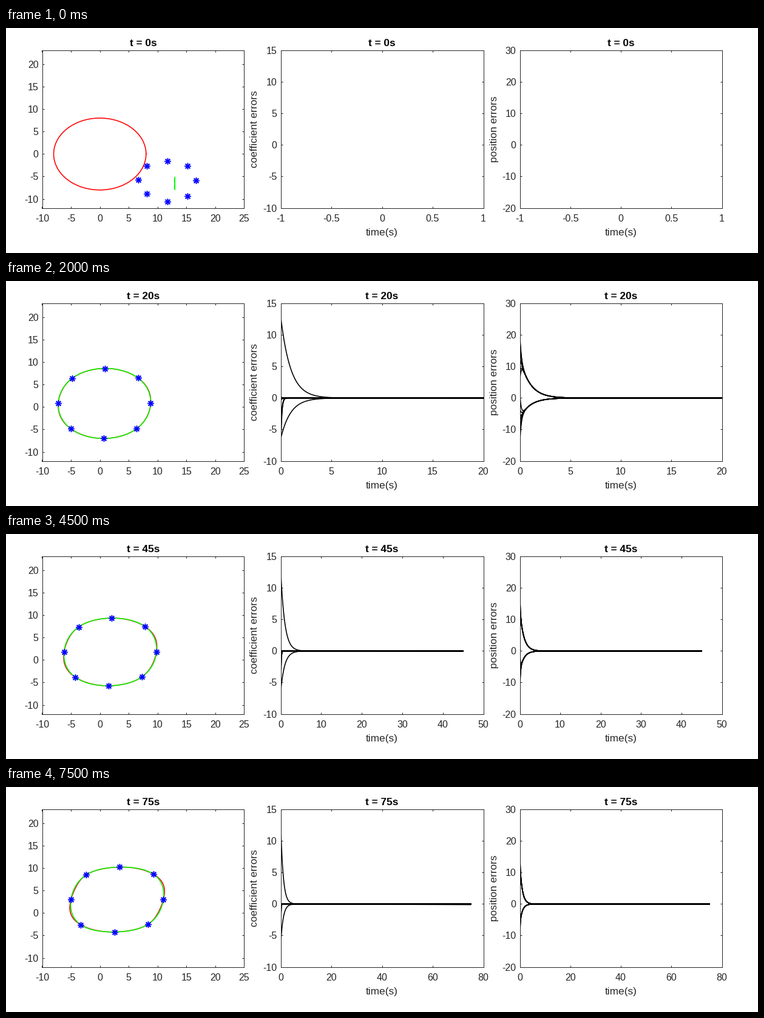
A matplotlib script for the animation above (8000 ms loop, 1239 by 372 pixels).

```python
import numpy as np
import matplotlib.pyplot as plt
from matplotlib.animation import FuncAnimation

W, H, DPI = 1239, 372, 64
PX = 72 / DPI            # points per pixel
INK = "#262626"
STEP = 5                 # simulated seconds per frame
FRAMES = 16

plt.rcParams["font.family"] = "Liberation Sans"
plt.rcParams["axes.unicode_minus"] = False

fig = plt.figure(figsize=(W / DPI, H / DPI), dpi=DPI, facecolor="white")


def put_text(x, y, s, **kw):
    return fig.text(x / W, 1 - y / H, s, fontsize=17.2 * PX, ha="center",
                    va="baseline", rotation_mode="anchor", **kw)


def set_ticks(ax, values):
    ax.set_xticks(values, [f"{v:g}" for v in values])
    ax.set_xlim(values[0], values[-1])


def make_axes(left, right, ylim, yticks, ylabel=None):
    top, bottom = 37.5, 297.5
    ax = fig.add_axes([left / W, 1 - bottom / H, (right - left) / W, (bottom - top) / H])
    ax.set_ylim(*ylim)
    ax.set_yticks(yticks, [f"{v:g}" for v in yticks])
    ax.tick_params(direction="in", top=True, right=True, length=3.4 * PX, width=PX,
                   color=INK, labelcolor=INK, labelsize=16 * PX)
    ax.tick_params(axis="x", pad=10.5 * PX)
    ax.tick_params(axis="y", pad=6 * PX)
    for spine in ax.spines.values():
        spine.set(color=INK, linewidth=PX)
    mid = (left + right) / 2
    title = put_text(mid, 30, "", weight="bold", color="black")
    if ylabel:
        put_text(mid, 343, "time(s)", color=INK)
        put_text(left - 38, 167.5, ylabel, rotation=90, color=INK)
    return ax, title


ax_map, title_map = make_axes(59.5, 392.5, (-12, 23), range(-10, 21, 5))
ax_coef, title_coef = make_axes(452.5, 786.5, (-10, 15), range(-10, 16, 5), "coefficient errors")
ax_pos, title_pos = make_axes(846.5, 1179.5, (-20, 30), range(-20, 31, 10), "position errors")
set_ticks(ax_map, range(-10, 26, 5))
titles = (title_map, title_coef, title_pos)

LINE = dict(lw=1.6 * PX, solid_joinstyle="round")
goal, = ax_map.plot([], [], color="red", **LINE)
estimate, = ax_map.plot([], [], color="lime", **LINE)
agents, = ax_map.plot([], [], ls="none", marker=(8, 2, 0), ms=10.5 * PX, mew=1.5 * PX,
                      color="blue", zorder=5)

theta = np.linspace(0, 2 * np.pi, 401)
slots = np.arange(8) * np.pi / 4
START = np.array([(16.65, -5.85), (15.2, -2.65), (11.72, -1.55), (8.15, -2.65),
                  (6.69, -5.73), (8.15, -8.8), (11.72, -10.55), (15.2, -9.35)]).T

# drift per second of the closed curve's harmonics
CENTER = 0.04
C5, S5 = -0.00093, 0.00133


def fitted(a, t):
    """Curve rebuilt from low harmonics, with the decaying start-up error."""
    slow, fast = np.exp(-t), np.exp(-10 * t)
    c1, s1, c3, s3 = np.cos(a), np.sin(a), np.cos(3 * a), np.sin(3 * a)
    x = (CENTER * t + 13 * slow + 8 * (1 - fast) * c1
         + t * (0.00155 * (c1 - c3) + 0.0073 * s1 + 0.0017 * s3))
    y = (CENTER * t - 6.55 * slow + (8 - 6.62 * fast) * s1
         + t * (0.0006 * (c1 - c3) - 0.0061 * s1 + 0.0043 * s3))
    return x, y


def wanted(a, t):
    """True curve: adds a fifth harmonic that vanishes at the eight slots."""
    x, y = fitted(a, t)
    slow, fast = np.exp(-t), np.exp(-10 * t)
    x += t * (C5 * (np.cos(5 * a) - np.cos(3 * a)) + S5 * (np.sin(5 * a) + np.sin(3 * a)))
    x += 8 * fast * np.cos(a) - 13 * slow
    y += 6.62 * fast * np.sin(a) + 6.55 * slow
    return x, y


# error histories
time = np.concatenate([np.arange(0, 6, 0.02), np.arange(6, 76, 1.0)])
slow = np.exp(-1.03 * time)
coef = [13 * slow, -6.5 * slow]
coef += [e * np.exp(-10 * time) for e in (-9, -8, -6.6)]
coef += [0.2 * np.exp(-6 * time) + 0.0006 * time,
         -0.35 * np.exp(-6 * time) + C5 * time,
         -S5 * time, 0 * time]
pos = [base * slow + (e - base) * np.exp(-8 * time)
       for base, starts in ((13, (21, 20, 18.7, 13, 12.6, 7.5, 5)),
                            (-6.5, (2.3, -3, -6, -8, -12, -13.3, -15.2)))
       for e in starts]


def add_curves(ax, curves):
    return [(ax.plot([], [], color="black", **LINE)[0], c) for c in curves]


curves = add_curves(ax_coef, coef) + add_curves(ax_pos, pos)


def time_ticks(t):
    if t == 0:
        return [-1, -0.5, 0, 0.5, 1]
    step = next(s for s in (1, 2, 5, 10, 20) if t <= 6 * s)
    return [step * k for k in range(int(np.ceil(t / step)) + 1)]


def draw(i):
    t = STEP * i
    for title in titles:
        title.set_text(f"t = {t}s")
    goal.set_data(*wanted(theta, t))
    estimate.set_data(*fitted(theta, t))
    agents.set_data(*(fitted(slots, t) if t else START))
    for ax in (ax_coef, ax_pos):
        set_ticks(ax, time_ticks(t))
    seen = (time <= t + 1e-6) & (t > 0)
    for line, values in curves:
        line.set_data(time[seen], values[seen])
    return [goal, estimate, agents]


anim = FuncAnimation(fig, draw, frames=FRAMES, init_func=lambda: draw(0),
                     interval=500, repeat=True, repeat_delay=0, blit=False)
plt.show()
```
